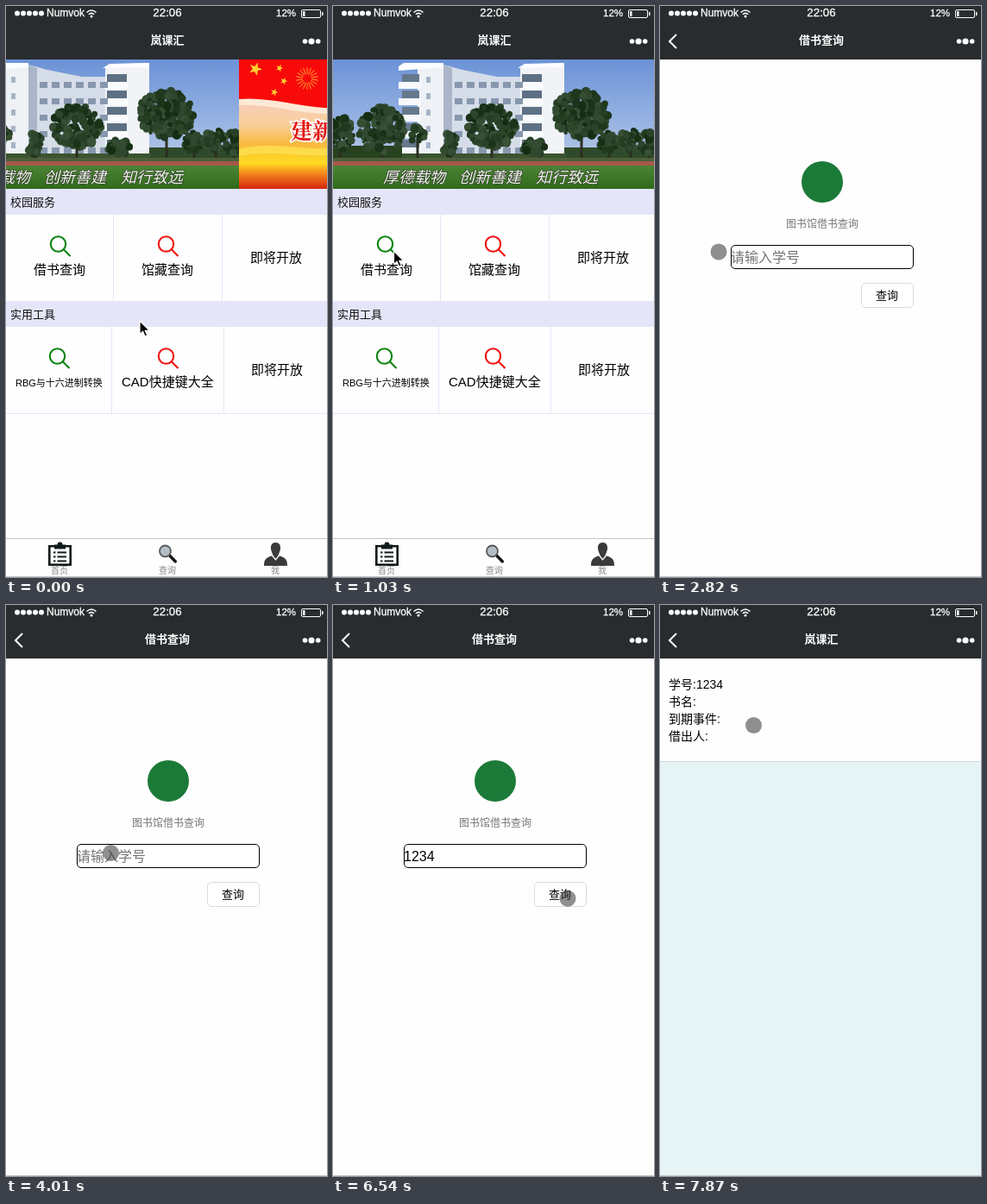
An HTML page for the animation above (8 s loop, 372 by 662 pixels).

```html
<!DOCTYPE html>
<html lang="zh-CN">
<head>
<meta charset="utf-8">
<title>校园服务</title>
<style>
html, body { margin: 0; width: 100%; height: 100%; overflow: hidden; background: #fefefe; }
svg { display: block; width: 372px; height: 662px; }
text { font-family: "Liberation Sans", "Noto Sans CJK SC", "Noto Sans CJK", sans-serif; white-space: pre; }
.mid { text-anchor: middle; }
.art { font-family: "Noto Serif CJK SC", "Noto Sans CJK SC", "Noto Serif", serif; }
</style>
</head>
<body>
<svg viewBox="0 0 372 662" xmlns="http://www.w3.org/2000/svg">
  <defs>
    <linearGradient id="sky" x2="0" y2="1">
      <stop stop-color="#6c92d6"/><stop offset=".55" stop-color="#94b1e2"/><stop offset="1" stop-color="#b9cbe6"/>
    </linearGradient>
    <linearGradient id="grass" x2="0" y2="1">
      <stop stop-color="#4c8436"/><stop offset="1" stop-color="#2f6a1a"/>
    </linearGradient>
    <linearGradient id="gold" x2="0" y2="1">
      <stop offset=".3" stop-color="#f6cdbd"/><stop offset=".5" stop-color="#f9cf9c"/><stop offset=".66" stop-color="#f8b93c"/>
      <stop offset=".8" stop-color="#ffdc22"/><stop offset=".88" stop-color="#f4871c"/><stop offset="1" stop-color="#d5260e"/>
    </linearGradient>
    <g id="lens" fill="none" stroke-width="2.100">
      <circle cx="10" cy="10" r="8.700"/><path d="M16.300 16.300 24 24"/>
    </g>
    <clipPath id="strip"><rect y="62" width="372" height="150"/></clipPath>
  </defs>
  <rect width="372" height="662" fill="#fefefe"/>

  <g id="home">
    <g clip-path="url(#strip)">
      <g id="banner">
        <g id="photo">
          <rect y="62" width="373" height="122" fill="url(#sky)"/>
          <g id="building"></g>
          <g id="trees"></g>
          <rect y="176" width="373" height="4" fill="#4c5f3c"/>
          <rect y="180" width="373" height="6" fill="#a4584a"/>
          <rect y="185" width="373" height="27" fill="url(#grass)"/>
          <g class="art" id="motto" font-size="18" font-style="italic" fill="#f4f4f0" stroke="#33402c" stroke-width="1.200" paint-order="stroke"></g>
        </g>
        <g id="poster" transform="translate(372 62)">
          <rect width="372" height="150" fill="url(#gold)"/>
          <path d="M0 0H372V50C320 66 250 42 190 54S90 62 60 56 22 46 0 48Z" fill="#f80a0a"/>
          <path d="M0 46C40 42 80 60 130 56V62C80 68 40 50 0 53Z" fill="#ffe9d6"/>
          <path d="M0 104C40 92 80 110 130 100V108C80 116 40 104 0 112Z" fill="#ffec5e" opacity=".6"/>
          <g id="stars" fill="#ffd02e"></g>
          <g id="rays" stroke="#ffb43c" stroke-width=".8"></g>
          <text class="art" x="60" y="92" font-size="25" font-weight="700" fill="#e3120b" stroke="#fff" stroke-width="3.500" paint-order="stroke">建新校园</text>
        </g>
      </g>
    </g>
    <path d="M0 212H372V242H0ZM0 342H372V372H0Z" fill="#e5e5f9"/>
    <path d="M124.500 242V342M250.500 242V342M122.500 372V472M252.500 372V472M0 472.500H372" stroke="#e5e5f9"/>
    <g font-size="13" fill="#111"><text x="5" y="232">校园服务</text><text x="5" y="362">实用工具</text></g>
    <g stroke="#0a820f"><use href="#lens" x="50.500" y="266"/><use href="#lens" x="49.500" y="396"/></g>
    <g stroke="#f01010"><use href="#lens" x="175.500" y="266"/><use href="#lens" x="175.500" y="396"/></g>
    <g font-size="15" fill="#000">
      <text x="32" y="311">借书查询</text><text x="157" y="311">馆藏查询</text><text x="283" y="297">即将开放</text>
      <text x="11" y="441" font-size="11">RBG与十六进制转换</text>
      <text x="134" y="441">CAD快捷键大全</text><text x="284" y="427">即将开放</text>
    </g>
    <g id="tabs">
      <path d="M0 617.500H372" stroke="#c4c4c8"/>
      <path d="M50.300 626.300H74.700V647.700H50.300Z" fill="#fff" stroke="#111a1a" stroke-width="2.600"/>
      <path d="M56 624.500H59.500A3 3 0 0 1 65.500 624.500H69V629.500H56Z" fill="#111a1a"/>
      <path d="M55 633.500H57.500M59.500 633.500H70M55 638.500H57.500M59.500 638.500H70M55 643.500H57.500M59.500 643.500H70" stroke="#111a1a" stroke-width="2"/>
      <path d="M190 637.500 196.300 644" stroke="#151515" stroke-width="3.400" stroke-linecap="round"/>
      <circle cx="184.500" cy="632" r="6.500" fill="#b4bfc5" stroke="#55595c" stroke-width="1.800"/>
      <path d="M312.500 622C316.500 622 318.500 625 318 629.500 317.500 633 316 635 315.500 637L312.500 641 309.500 637C309 635 307.500 633 307 629.500 306.500 625 308.500 622 312.500 622ZM308 637.500 312.500 643 317 637.500C324 639.500 326 642 326 649H299C299 642 301 639.500 308 637.500Z" fill="#3a3a3c"/>
      <g class="mid" font-size="10" fill="#858585"><text x="62" y="658">首页</text><text x="187" y="658">查询</text><text x="312" y="658">我</text></g>
    </g>
  </g>

  <g id="form">
    <rect y="62" width="372" height="600" fill="#fefefe"/>
    <circle cx="188" cy="204" r="24" fill="#1c7a38"/>
    <text x="146" y="257" font-size="12" fill="#777">图书馆借书查询</text>
    <rect x="82.500" y="277.500" width="211" height="27" rx="4.500" fill="#fff" stroke="#000"/>
    <text id="entry" x="82" y="297" font-size="16"></text>
    <rect id="caret" y="280" width="1.200" height="22" fill="#000"/>
    <rect x="233.500" y="321.500" width="60" height="28" rx="4.500" fill="#fff" stroke="#dcdcdc"/>
    <text class="mid" x="263" y="340" font-size="13" font-weight="500">查询</text>
  </g>

  <g id="result">
    <rect y="62" width="372" height="119" fill="#fefefe"/>
    <rect y="181" width="372" height="481" fill="#e6f4f6"/>
    <path d="M0 181.500H372" stroke="#cfdadb"/>
    <g font-size="14"><text x="10" y="97">学号:1234</text><text x="10" y="117">书名:</text><text x="10" y="137">到期事件:</text><text x="10" y="157">借出人:</text></g>
  </g>

  <path d="M0 661.500H372" stroke="#cacaca"/>
  <rect width="372" height="62" fill="#282c2e"/>
  <g fill="#fff">
    <g id="signal"></g>
    <g stroke="#fff" stroke-width=".3">
      <text x="47" y="12" font-size="12">Numvok</text>
      <text class="mid" x="187" y="12" font-size="13.300">22:06</text>
      <text x="313" y="12" font-size="11.500">12%</text>
    </g>
    <rect x="344" y="6" width="2.500" height="6"/><rect x="366" y="7" width="1.500" height="4"/>
    <circle cx="99" cy="12" r="1.500"/>
    <circle cx="346.500" cy="41" r="2.800"/><circle cx="354" cy="41" r="3.600"/><circle cx="361.700" cy="41" r="2.800"/>
    <text class="mid" id="title" x="187" y="43.800" font-size="13" font-weight="600"></text>
  </g>
  <g fill="none" stroke="#fff">
    <rect x="342.500" y="4.500" width="22" height="9" rx="1.500"/>
    <path d="M93.500 7.500Q99 2.500 104.500 7.500M95.800 9.800Q99 7 102.200 9.800" stroke-width="1.500"/>
    <path id="back" d="M19 33 11 41 19 49" stroke-width="2"/>
  </g>

  <path id="arrow" d="M0 0V15.500L3.600 12.200 6 18 8.800 16.800 6.300 11.300H11.300Z" fill="#000" stroke="#fff" stroke-width="1.200"/>
  <path id="hand" d="M-4 -8C-2.500 -9.500 -1 -8 -.8 -6.500L.3 -2.500C1 -4 2.500 -3.500 3 -2 4 -3.200 5.300 -2.500 5.700 -1.200 7 -2 8 -1 8 .5 8 4 6.500 5 6.500 8.500H-1.500C-2 6 -5.500 3.500 -7 .8 -7.500 -.8 -5.500 -1.800 -3.200 .6L-5 -6C-5.200 -7 -4.800 -7.800 -4 -8ZM.5 2.500V6M3 2.500V6M5.300 2.500V6" fill="#fff" stroke="#000" stroke-width="1.100" stroke-linejoin="round"/>
  <circle id="dot" r="9.500" fill="#333" opacity=".55"/>
</svg>
<script>
const $ = id => document.getElementById(id);
const LOOP = 8000, W = 372;
const APP = '岚课汇';

// Screen updates: [first, last, count]
const UPDATES = [
  [0, 0, 1], [150, 1030, 7], [1920, 1920, 1], [2370, 3410, 8], [3560, 3560, 1],
  [4010, 4010, 1], [4450, 5350, 4], [5790, 6540, 6], [6840, 7140, 3], [7430, 7870, 4]
];
// Pointer path: [time, x, y]
const POINTER = [
  [150, 155, 365], [960, 70.5, 284], [1919, 70.5, 284], [1920, 68, 285], [2820, 68, 285],
  [3410, 121.5, 287.5], [5700, 121.5, 287.5], [6540, 272, 340.3],
  [6800, 272, 340.3], [6840, 272, 345], [7300, 272, 345], [7870, 108.5, 139.5]
];
const BANNER = [[0, -102], [480, 0], [2330, 0], [2370, -6], [2520, -50], [2860, -372]];

const clamp = v => Math.max(0, Math.min(1, v));
const ease = v => { v = clamp(v); return v * v * (3 - 2 * v); };
const easeOut = v => 1 - (1 - clamp(v)) ** 2;

function track(keys, t, curve) {
  let i = 0;
  while (i < keys.length - 2 && t >= keys[i + 1][0]) i++;
  const [a, b] = [keys[i], keys[i + 1]];
  const k = curve((t - a[0]) / (b[0] - a[0]));
  return a.slice(1).map((v, n) => v + (b[n + 1] - v) * k);
}

function lastUpdate(t) {
  let at = 0;
  for (const [from, to, count] of UPDATES) {
    if (t < from) break;
    const step = count > 1 ? (to - from) / (count - 1) : 1;
    at = from + step * Math.min(count - 1, Math.floor((t - from) / step + 1e-6));
  }
  return at;
}

let seed = 7;
const rnd = () => (seed = (seed * 16807) % 2147483647) / 2147483647;
const box = (x, y, w, h, fill) => `<rect x="${x}" y="${y}" width="${w}" height="${h}" fill="${fill}"/>`;

function building() {
  let s = '<path d="M98 70 128 66V179H98Z" fill="#eef1f6"/>' +
    '<path d="M128 68 150 74 190 82H217V179H128Z" fill="#d5dde9"/>' +
    '<path d="M128 68 138 72V179H128Z" fill="#aab6c8"/>' +
    '<path d="M217 70 240 67 268 66V179H217Z" fill="#f1f3f7"/>' +
    '<path d="M76 70 82 66H128V71L76 75Z" fill="#fcfdff"/><path d="M214 72 222 67 268 66V71Z" fill="#fcfdff"/>';
  for (let row = 0; row < 5; row++) {
    const y = 79 + row * 19;
    s += box(80, y, 20, 10, '#66788c') + box(76, y + 9, 26, 8, '#f6f8fb');
    s += box(219, y, 23, 9, '#5e7083') + box(216, y + 9, 28, 8, '#fafbfd');
    for (let x = 141; x < 212; x += 14) s += box(x, y + 9, 9, 7, '#8797ad');
    s += box(108, y + 3, 5, 7, '#a7b4c5');
  }
  return s;
}

function tree(x, y, rx, ry, count) {
  let s = box(x - 1.5, y, 3, 178 - y, '#2c2f20');
  for (let i = 0; i < count; i++) {
    const a = rnd() * 6.283, r = Math.sqrt(rnd()) * .88;
    const g = 44 + Math.round(rnd() * 38);
    s += `<circle cx="${(x + Math.cos(a) * r * rx).toFixed(1)}" cy="${(y + Math.sin(a) * r * ry).toFixed(1)}" r="${(2 + rnd() * 3.5).toFixed(1)}" fill="rgb(${g - 24},${g},${g - 26})"/>`;
  }
  return s;
}

function star(x, y, r) {
  const pts = Array.from({ length: 10 }, (_, i) => {
    const a = i * Math.PI / 5 - 1.2, d = i % 2 ? r * .4 : r;
    return [x + Math.cos(a) * d, y + Math.sin(a) * d].map(v => v.toFixed(1));
  });
  return `<polygon points="${pts.join(' ')}"/>`;
}

$('building').innerHTML = building();
$('trees').innerHTML = box(0, 162, 80, 17, '#28421f') + box(268, 164, 105, 15, '#2f4a2a') + box(80, 171, 190, 8, '#3a5330') +
  [[8, 150, 18, 24, 60], [57, 143, 31, 30, 150], [98, 150, 10, 12, 20], [136, 160, 9, 17, 25], [184, 140, 32, 28, 150],
   [232, 164, 16, 10, 28], [288, 126, 36, 32, 190], [320, 158, 14, 13, 35], [345, 156, 14, 14, 40], [366, 158, 11, 14, 30]]
    .map(a => tree(...a)).join('');
$('motto').innerHTML = [['厚德载物', 58], ['创新善建', 146], ['知行致远', 235]]
  .map(([s, x]) => `<text x="${x}" y="205">${s}</text>`).join('');
$('stars').innerHTML = [[19, 11, 8], [47, 10, 4.5], [52, 25, 4.5], [41, 38, 4.5]].map(a => star(...a)).join('');
$('rays').innerHTML = Array.from({ length: 18 }, (_, i) =>
  `<path d="M0 5V13" transform="translate(79 22) rotate(${i * 20})"/>`).join('');
$('signal').innerHTML = [0, 1, 2, 3, 4].map(i => `<circle cx="${13 + i * 7}" cy="8.5" r="3"/>`).join('');

const show = (id, on) => $(id).setAttribute('visibility', on ? 'visible' : 'hidden');
const move = (id, x, y = 0) => $(id).setAttribute('transform', `translate(${x.toFixed(2)} ${y.toFixed(2)})`);

function render(now) {
  const t = lastUpdate(now);
  const opened = t >= 2500, sent = t >= 6840;

  move('banner', track(BANNER, t, t < 600 ? easeOut : clamp)[0]);
  show('tabs', !opened);
  show('back', opened);
  $('title').textContent = opened && !sent ? '借书查询' : APP;
  move('form', W * (1 - ease((t - 2519) / 296)));
  move('result', W * (1 - ease((t - 6840) / 300)));

  const typed = t < 4450 ? 0 : Math.min(4, 1 + Math.floor((t - 4450) / 300 + 1e-6));
  $('entry').textContent = typed ? '1234'.slice(0, typed) : '请输入学号';
  $('entry').setAttribute('fill', typed ? '#000' : '#757575');
  $('caret').setAttribute('x', typed ? 82 + typed * 8.9 : 83);
  show('caret', (t >= 3560 && t < 4010) || (t >= 4450 && t < 5790) || (t >= 6230 && t < 6540));

  const [x, y] = track(POINTER, t, ease);
  const kind = t < 1920 ? 'arrow' : t >= 6840 && t < 7430 ? 'hand' : 'dot';
  for (const id of ['arrow', 'hand', 'dot']) {
    show(id, id === kind);
    move(id, x, y);
  }
}

const start = performance.now();
function frame() {
  render((performance.now() - start) % LOOP);
  requestAnimationFrame(frame);
}
frame();
</script>
</body>
</html>
```
